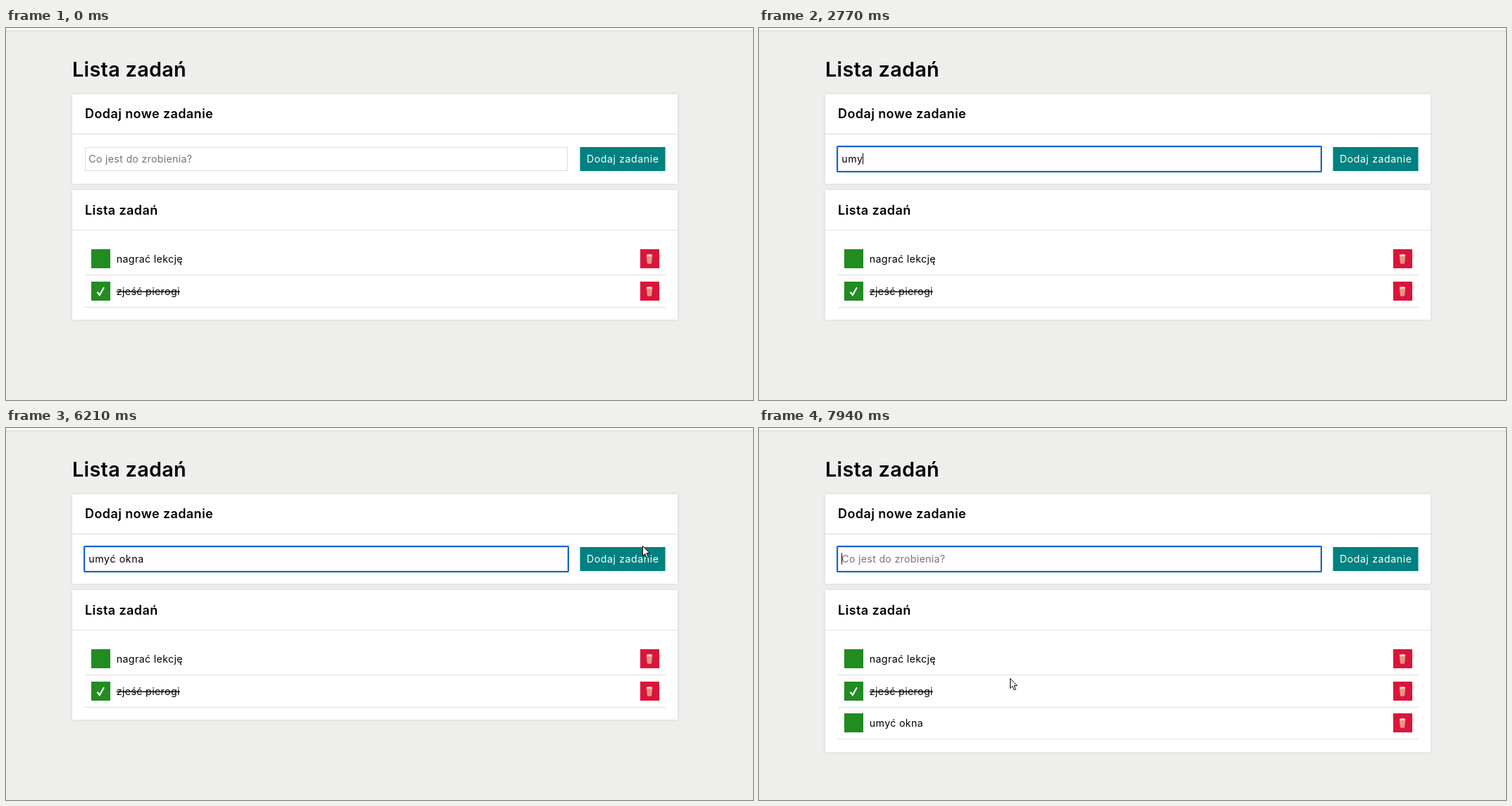
Animation, 1060 px wide and 528 px high, one loop 8000 ms. Source, as an HTML page:

```html
<!DOCTYPE html>
<html lang="pl">
<head>
<meta charset="utf-8">
<title>Lista zadań</title>
<style>
  html, body { margin: 0; width: 100%; height: 100%; overflow: hidden; background: #eeeeec; }
  svg { display: block; width: 100%; height: 100%; }
  text { font: 400 14.2px Montserrat, Inter, sans-serif; letter-spacing: .36px; white-space: pre; }
  .h1 { font-size: 28.8px; font-weight: 600; letter-spacing: .3px; }
  .h2 { font-size: 18px; font-weight: 600; letter-spacing: .4px; }
  .done { text-decoration: line-through; }
  .card { fill: #fff; filter: drop-shadow(0 0 2px #d4d4d4); }
  .line { stroke: #ddd; fill: none; }
</style>
</head>
<body>
<svg viewBox="0 0 1060 528" preserveAspectRatio="none">
  <defs>
    <g id="trash">
      <path d="M900 0h27v27h-27z" fill="#dc143c"/>
      <path d="M909 8.5h8l-1 11.5q-3 1.6-6 0z" fill="#efb9a0"/>
      <path d="M911 10v9.5M913 10v10M915 10v9.5" stroke="#c9604f" stroke-width=".7"/>
      <ellipse cx="913" cy="8.5" rx="4.2" ry="1.5" fill="#f6d9bd"/>
    </g>
  </defs>

  <path d="M0 0h1060v528H0z" fill="#eeeeec"/>
  <path d="M0 0h1060v3.5H0z" fill="#f8f9fb"/>
  <path d="M0 4h1060" stroke="#cfd2d7"/>
  <text class="h1" x="94" y="68.5">Lista zadań</text>

  <path class="card" d="M94 94h859v127H94z"/>
  <path class="line" d="M94 150.5h859"/>
  <text class="h2" x="112" y="128">Dodaj nowe zadanie</text>
  <rect class="line" x="112.5" y="169.5" width="684" height="33"/>
  <rect id="focus" x="111" y="168" width="687" height="36" rx="1" fill="none" stroke="#1463cf" stroke-width="2"/>
  <text id="field" x="117.3" y="191"></text>
  <path id="caret" d="M.5 177.5v16" stroke="#000"/>
  <g id="button">
    <rect id="face" x="814.5" y="169" width="121" height="34"/>
    <text x="824" y="191" fill="#fff" style="letter-spacing:.55px">Dodaj zadanie</text>
  </g>

  <rect id="list" class="card" x="94" y="230" width="859"/>
  <path class="line" d="M94 287h859"/>
  <text class="h2" x="112" y="265">Lista zadań</text>
  <g id="items"></g>

  <circle id="click" r="10.8" fill="#a6e23c" opacity=".72"/>
  <path id="arrow" d="M.5 .5v14l3.2-3 2.3 5.4 2.3-1-2.3-5.2h4.3z" fill="#fff" stroke="#000" stroke-linejoin="round"/>
  <path id="beam" d="M-3 -7.5h2q1 0 1 1q0-1 1-1h2M0-6.5v13M-3 7.5h2q1 0 1-1q0 1 1 1h2" fill="none" stroke="#111"/>
</svg>
<script>
const LOOP = 8000;
const $ = id => document.getElementById(id);
const show = (el, on) => el.setAttribute('visibility', on ? 'visible' : 'hidden');
const within = (t, spans) => spans.some(([a, b]) => t >= a && t < b);
const clamp = v => Math.max(0, Math.min(1, v));
const ease = v => v * v * (3 - 2 * v);

const task = 'umyć okna';
const keyTimes = [2310, 2540, 2720, 3530, 3760, 4000, 4180, 4350, 4580];
const caretOn = [[1130, 1660], [2190, 3230], [3530, 4350], [4580, 4880], [5470, 5940], [6690, 7220], [7750, LOOP]];
const focusOn = [[1130, 6510], [6690, LOOP]];
const clicks = [[1130, 1200], [6510, 6690]];
const hoverOn = 6240, hoverOff = 7340, fade = 150;

// Each pointer move: time and place of successive stops.
const moves = [
  [[110, 823, 464], [900, 222, 181], [2310, 222, 181]],
  [[5230, 300, 103], [5300, 300, 103]],
  [[5500, 1006, 0], [5720, 1014, 52], [6210, 903, 167], [6400, 899, 184],
   [7220, 899, 184], [7940, 356, 355], [LOOP, 356, 355]]
];

function pointer(t) {
  const stops = moves.find(m => t >= m[0][0] && t < m[m.length - 1][0]);
  if (!stops) return null;
  const i = stops.findIndex(s => s[0] > t);
  const [t0, x0, y0] = stops[i - 1], [t1, x1, y1] = stops[i];
  const k = ease((t - t0) / (t1 - t0));
  return [x0 + (x1 - x0) * k, y0 + (y1 - y0) * k];
}

function item(label, i, done) {
  const y = 314 + 45.6 * i;
  return `<g transform="translate(0 ${Math.round(y)})">
    <path d="M121 0h27v27h-27z" fill="#228b22"/>
    ${done ? '<path d="M129.5 14.8l3.3 4.2 6.2-10.8" fill="none" stroke="#fff" stroke-width="2.2"/>' : ''}
    <text x="156.8" y="19"${done ? ' class="done"' : ''}>${label}</text>
    <use href="#trash"/>
    <path class="line" d="M112 36.5h824"/>
  </g>`;
}
$('items').innerHTML = item('nagrać lekcję', 0) + item('zjeść pierogi', 1, true) + item(task, 2);
const added = $('items').lastElementChild;

function draw(t) {
  const isAdded = t >= 6690;
  const typed = isAdded ? '' : task.slice(0, keyTimes.filter(k => t >= k).length);
  const field = $('field');
  field.textContent = typed || 'Co jest do zrobienia?';
  field.setAttribute('fill', typed ? '#000' : '#757575');
  field.style.letterSpacing = typed ? '.6px' : '.3px';
  const end = typed ? Math.round(field.getComputedTextLength()) : 0;
  $('caret').setAttribute('transform', `translate(${117 + end} 0)`);
  show($('caret'), within(t, caretOn));
  show($('focus'), within(t, focusOn));

  show(added, isAdded);
  $('list').setAttribute('height', isAdded ? 230 : 184);

  const hover = clamp((t - hoverOn) / fade) - clamp((t - hoverOff) / fade);
  const press = clamp((t - 6510) / 60) * (isAdded ? 0 : 1);
  const tone = Math.round(128 * (1 + .2 * hover + .2 * press));
  $('face').setAttribute('fill', `rgb(0 ${tone} ${tone})`);
  $('button').setAttribute('transform', `translate(875 186) scale(${1 + .1 * hover}) translate(-875 -186)`);

  const at = pointer(t);
  const [x, y] = at || [0, 0];
  const inField = x > 112 && x < 797 && y > 169 && y < 203;
  const place = `translate(${x} ${y})`;
  for (const id of ['arrow', 'beam', 'click']) $(id).setAttribute('transform', place);
  show($('arrow'), at && !inField);
  show($('beam'), at && inField);
  show($('click'), within(t, clicks));
}

const start = performance.now();
function tick() {
  draw((performance.now() - start) % LOOP);
  requestAnimationFrame(tick);
}
tick();
</script>
</body>
</html>
```
